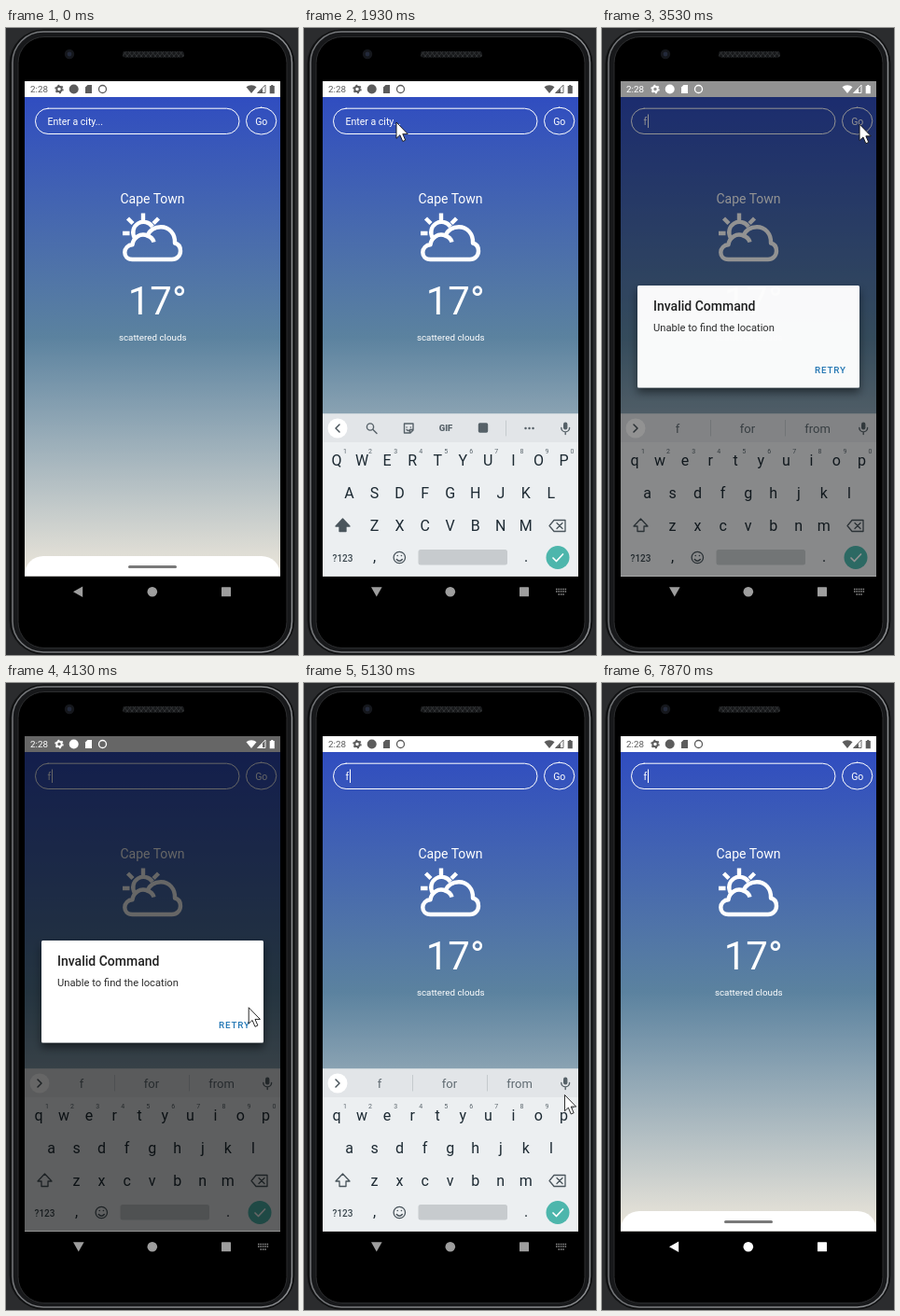
An HTML page for the animation above (7.94 s loop, 313 by 672 pixels).

```html
<!DOCTYPE html>
<html lang="en">
<head>
<meta charset="utf-8">
<title>Weather app</title>
<style>
html, body { margin: 0; width: 100%; height: 100%; overflow: hidden; background: #2b2c2e; }
svg { display: block; width: 100vw; height: 100vh; font-family: Roboto, "Noto Sans", sans-serif; user-select: none; cursor: default; }
.line { fill: none; stroke-linecap: round; stroke-linejoin: round; }
.mid { text-anchor: middle; }
.white { fill: #fff; }
.key { font-size: 16px; fill: #1d2a33; text-anchor: middle; }
.num { font-size: 7px; fill: #5b666d; text-anchor: middle; }
.word { font-size: 13px; fill: #5f6a71; text-anchor: middle; }
.tool { stroke: #566168; stroke-width: 1.4; }
</style>
</head>
<body>
<svg viewBox="0 0 313 672" preserveAspectRatio="none">
  <defs>
    <linearGradient id="sky" x1="0" y1="0" x2="0" y2="1">
      <stop offset="0" stop-color="#304dc0"/>
      <stop offset=".5" stop-color="#5b829f"/>
      <stop offset="1" stop-color="#ede7db"/>
    </linearGradient>
    <linearGradient id="rim" x1="0" y1="0" x2="1" y2="0">
      <stop offset="0" stop-color="#747679"/>
      <stop offset=".5" stop-color="#85878a"/>
      <stop offset="1" stop-color="#8d8f92"/>
    </linearGradient>
    <pattern id="mesh" width="5" height="6" patternUnits="userSpaceOnUse">
      <path d="M0 0L5 6M5 0L0 6" stroke="#303234" stroke-width="1"/>
    </pattern>
    <clipPath id="screen"><rect x="20" y="57" width="274" height="530.5"/></clipPath>
    <filter id="shade" x="-20%" y="-20%" width="140%" height="150%">
      <feDropShadow dx="0" dy="5" stdDeviation="5" flood-opacity=".5"/>
    </filter>
  </defs>

  <!-- phone body -->
  <rect width="313" height="672" fill="#2b2c2e"/>
  <rect x="4.5" y="2.5" width="304" height="668" rx="36" fill="#151617" stroke="#111213" stroke-width="2"/>
  <rect x="7" y="4" width="299.5" height="665" rx="33" fill="#17181a" stroke="url(#rim)" stroke-width="1.5"/>
  <rect x="13" y="9.5" width="288" height="655" rx="28" fill="#000" stroke="#2c2d2f"/>
  <circle cx="68" cy="28" r="5.2" fill="#15171c"/>
  <circle cx="68" cy="28" r="2.4" fill="#23293a"/>
  <rect x="125" y="25" width="66" height="6.5" rx="3" fill="#17181a"/>
  <rect x="125" y="25" width="66" height="6.5" rx="3" fill="url(#mesh)"/>

  <g clip-path="url(#screen)">
    <!-- weather -->
    <rect x="20" y="74" width="274" height="514" fill="url(#sky)"/>
    <rect class="line" x="31.5" y="86.2" width="218.5" height="27.3" rx="13.6" stroke="#fff"/>
    <text id="entry" class="white" x="44.6" y="103.6" font-size="10.5">Enter a city...</text>
    <rect id="caret" class="white" y="92.5" width="1" height="14.5"/>
    <g id="go">
      <rect class="line" x="257.5" y="85.2" width="32.3" height="28.8" rx="16" ry="14.4" stroke="#fff"/>
      <text class="white mid" x="273.7" y="103.6" font-size="10.5">Go</text>
    </g>
    <text class="white mid" x="157" y="188.4" font-size="14">Cape Town</text>
    <g class="line" stroke="#fff" stroke-width="4.4" style="stroke-linecap:butt">
      <path d="M135.5 248C130 248 127.3 244.400 127.300 240.500C127.300 236 131 232.500 135.500 232.300C136.500 224.500 144 219.500 151.500 222.500C154.500 216 160 213.300 166 213.300C175 213.300 181.500 220.500 181 230.500C185 231.500 187 235 187 239C187 244 183 248 178 248Z"/>
      <path d="M151 222.500C155 223.500 157.500 226 158.500 229.500"/>
      <path d="M138 225A10.500 10.500 0 0 1 157 213M147 198.500V206M130.500 204L136 209.500M125 220H132.500M163.500 204L158 209.500"/>
    </g>
    <text class="white" x="130.700" y="307" font-size="42">17°</text>
    <text class="white mid" x="157.200" y="335" font-size="9.8">scattered clouds</text>
    <path class="white" d="M20 588V586A20 20 0 0 1 40 566H274A20 20 0 0 1 294 586V588Z"/>
    <rect x="131" y="576" width="52" height="3" rx="1.5" fill="#797979"/>

    <!-- keyboard -->
    <g id="board">
      <rect x="20" y="413.500" width="274" height="176" fill="#eceff1"/>
      <rect x="20" y="413.500" width="274" height="30.500" fill="#e2e5e8"/>
      <circle class="white" cx="36" cy="429" r="10.500"/>
      <path id="chevron" class="line" d="M38 425L34 429L38 433" stroke="#49545b" stroke-width="1.500"/>
      <g id="tools" class="line tool">
        <circle cx="71" cy="427.500" r="3.600"/><path d="M74 430.500L78 434.500"/>
        <path d="M107.500 424H117V431L114 434H107.500ZM117 430.500H113.500V434M110 428h.1M114.300 428h.1M110 430.500Q112 432.500 114 430.500"/>
        <text class="mid" x="152" y="432.300" font-size="9.500" font-weight="900" fill="#566168" stroke="none">GIF</text>
        <rect x="187.500" y="424" width="9" height="9" rx="1" fill="#566168"/>
        <path d="M216.500 421V437" stroke="#c5cacd" stroke-width="1"/>
        <path d="M237.500 429h.1M241.500 429h.1M245.500 429h.1" stroke-width="2.400"/>
      </g>
      <g id="words">
        <path d="M116.500 420V437.500M196.500 420V437.500" stroke="#c5cacd"/>
        <text class="word" x="81" y="433.500">f</text>
        <text class="word" x="156" y="433.500">for</text>
        <text class="word" x="231" y="433.500">from</text>
      </g>
      <rect x="278" y="422.500" width="4.400" height="8" rx="2.200" fill="#566168"/>
      <path class="line tool" d="M275.800 428.500A4.400 4.400 0 0 0 284.600 428.500M280.200 433V435.500"/>
      <g id="keys"></g>
      <path id="shift" class="line" d="M41.500 526L49 534H45V539.500H38V534H34Z" stroke="#4a555c" stroke-width="1.300"/>
      <path class="line" d="M263 533.500L268 527.500H280V539.500H268ZM271 530.500L277 536.500M277 530.500L271 536.500" stroke="#4a555c" stroke-width="1.300"/>
      <text class="mid" x="41.500" y="571.500" font-size="10" font-weight="500" fill="#3c484f">?123</text>
      <text class="key" x="75.500" y="571.500">,</text>
      <text class="key" x="238" y="571.500">.</text>
      <circle class="line" cx="102.300" cy="567.500" r="6.200" stroke="#4a555c" stroke-width="1.300"/>
      <path class="line" d="M100.200 565.500h.1M104.400 565.500h.1M99.300 569.500Q102.300 573 105.300 569.500" stroke="#4a555c" stroke-width="1.500"/>
      <rect x="122.500" y="559" width="95.500" height="16.500" rx="2.500" fill="#c7cbce"/>
      <circle cx="272" cy="567.500" r="12.500" fill="#4db6ac"/>
      <path class="line" d="M267 568L270.500 571.500L277.500 564" stroke="#fff" stroke-width="1.700"/>
    </g>

    <!-- status bar -->
    <rect class="white" x="20" y="57" width="274" height="17"/>
    <rect id="dim" x="20" y="57" width="274" height="531"/>
    <g id="status" fill="currentColor">
      <text x="26" y="69.200" font-size="9.800">2:28</text>
      <circle class="line" cx="57" cy="65.500" r="2.700" stroke="currentColor" stroke-width="1.900"/>
      <circle class="line" cx="57" cy="65.500" r="4" stroke="currentColor" stroke-width="1.500" stroke-dasharray="1.900 2.290" style="stroke-linecap:butt"/>
      <circle cx="72.700" cy="65.500" r="5"/>
      <path d="M87.500 61H92V70H85V63.500Z"/>
      <circle class="line" cx="103.500" cy="65.500" r="4" stroke="currentColor" stroke-width="1.300"/>
      <path d="M263 70L257.500 63.300A8.500 8.500 0 0 1 268.500 63.300Z"/>
      <path d="M275 64.800V70H269.500Z"/>
      <path class="line" d="M278 61.500V69.500H270Z" stroke="currentColor" stroke-width=".9"/>
      <path d="M282.700 62H284.200V61H286.300V62H287.800V70.200H282.700Z"/>
    </g>

    <!-- alert -->
    <g id="alert">
      <rect class="white" x="38" y="276" width="238" height="109.500" rx="1.500" filter="url(#shade)"/>
      <text x="55" y="303.300" font-size="14" font-weight="500" fill="#1f1f1f">Invalid Command</text>
      <text x="55" y="325" font-size="11.200" fill="#2b2b2b">Unable to find the location</text>
      <text x="228" y="370" font-size="9.800" font-weight="500" letter-spacing=".87" fill="#2277b5">RETRY</text>
    </g>
  </g>

  <!-- navigation bar -->
  <rect id="ripple" x="46" y="588" width="64" height="32.500" rx="16" fill="#2e3031"/>
  <g id="nav">
    <path id="back" d="M72 604.300L82.200 598.500V610.100Z"/>
    <circle cx="156.800" cy="604.300" r="5.300"/>
    <rect x="231" y="599.300" width="10" height="10" rx=".6"/>
    <path id="mini" class="line" d="M270 601.500H281.500M270 604H281.500M272.500 607H279" stroke="#8f8f8f" stroke-width="1.500" stroke-dasharray="1.500 .9" style="stroke-linecap:butt"/>
  </g>
  <path id="arrow" d="M0 0V17.300L3.900 13.700L6.800 20.500L9.700 19.200L6.800 12.600H12.200Z" fill="#fff" stroke="#111" stroke-width=".9"/>
</svg>
<script>
const LOOP = 7940, STEP = 200 / 3;
const $ = id => document.getElementById(id);
const set = (id, name, value) => $(id).setAttribute(name, value);
const show = (id, on) => set(id, 'opacity', on === true ? 1 : on || 0);

const rows = [['QWERTYUIOP', 35, 468.5], ['ASDFGHJKL', 48.5, 503.5], ['ZXCVBNM', 75.5, 538.5]];
const letters = [];
function label(cls, x, y, text) {
  const el = document.createElementNS('http://www.w3.org/2000/svg', 'text');
  el.setAttribute('class', cls);
  el.setAttribute('x', x);
  el.setAttribute('y', y);
  el.textContent = text;
  $('keys').append(el);
  return el;
}
rows.forEach(([row, x0, y], r) => [...row].forEach((ch, i) => {
  const x = x0 + i * 27.05;
  letters.push({ el: label('key', x, y, ch), ch });
  if (!r) label('num', x + 9, 456, (i + 1) % 10);
}));

// each stop: time, then one or more values
const path = [
  [130, 295, 455], [200, 270, 375], [330, 200, 212], [470, 136, 126], [600, 104, 104], [670, 99, 101],
  [2330, 99, 101], [2400, 106, 104], [2530, 160, 111], [2730, 245, 92], [2800, 271, 79], [2930, 277, 95], [3000, 276, 103],
  [3530, 276, 103], [3600, 277, 108], [3870, 274, 200], [4000, 268, 290], [4130, 260.5, 346.5], [4200, 254, 374], [4330, 253, 388],
  [4400, 253, 388], [4470, 251, 383], [4730, 244, 365],
  [4930, 244, 365], [5000, 251, 380], [5130, 280, 440.5], [5400, 235, 520], [5730, 120, 590], [5930, 85, 612], [6130, 76, 608], [6400, 78.5, 604.5],
  [6730, 78.5, 602], [7000, 90, 580], [7330, 115, 553], [7400, 113, 563], [7470, 107, 588], [7530, 94, 620], [7600, 72, 655], [7670, 60, 680]
];
const slide = [[800, 174], [870, 125], [930, 65], [1000, 25], [1070, 7], [1130, 0], [6400, 0], [6470, 1], [6530, 16], [6600, 66], [6670, 130], [6730, 176]];
const shadow = [[3400, 0], [3470, .2], [3530, .42], [3600, .55], [3670, .6], [4930, .6], [5000, .4], [5070, .15], [5130, 0]];
const popup = [[3400, 0], [3470, .6], [3530, .97], [3600, 1], [4930, 1], [5000, .5], [5070, .12], [5130, 0]];
const press = [[2730, 1], [2800, .3], [2870, .45], [3000, 1]];
const tap = [[6270, 0], [6400, 1], [6500, 1], [6800, 0]];
const glow = [[6330, 158], [6470, 200], [6600, 255]];

function at(stops, t) {
  const n = stops.findIndex(s => s[0] > t);
  if (n === 0) return stops[0].slice(1);
  if (n < 0) return stops[stops.length - 1].slice(1);
  const a = stops[n - 1], b = stops[n], k = (t - a[0]) / (b[0] - a[0]);
  return a.slice(1).map((v, i) => v + (b[i + 1] - v) * k);
}
const within = (t, ...spans) => spans.some(([a, b]) => t >= a && t < b);

function draw(t) {
  const typed = t >= 2200, open = within(t, [870, 6600]);
  $('entry').textContent = typed ? 'f' : 'Enter a city...';
  set('caret', 'x', typed ? 49 : 45.3);
  show('caret', within(t, [600, 870], [1400, 1930], [2200, 2800], [3330, 5730], [6270, 6800], [7330, 7870]));
  show('go', at(press, t)[0]);

  set('board', 'transform', `translate(0 ${at(slide, t)[0]})`);
  show('board', within(t, [870, 6730]));
  letters.forEach(k => k.el.textContent = typed ? k.ch.toLowerCase() : k.ch);
  set('shift', 'style', typed ? '' : 'fill:#4a555c');
  set('chevron', 'transform', typed ? 'rotate(180 36 429)' : '');
  show('tools', !typed);
  show('words', within(t, [2200, 6470]));

  const alpha = at(popup, t)[0];
  show('dim', at(shadow, t)[0]);
  show('alert', alpha);
  set('status', 'color', alpha > .3 ? '#fff' : '#5c5c5c');

  const g = Math.round(at(glow, t)[0]);
  set('nav', 'fill', `rgb(${g},${g},${g})`);
  set('back', 'transform', open ? 'rotate(-90 77.5 604)' : '');
  show('mini', within(t, [870, 6470]));
  show('ripple', at(tap, t)[0]);

  const [x, y] = at(path, t);
  set('arrow', 'transform', `translate(${x} ${y})`);
  show('arrow', within(t, [130, 7670]));
}

const start = performance.now();
function tick() {
  const t = (performance.now() - start) % LOOP;
  draw(Math.floor((t + 4) / STEP) * STEP);
  requestAnimationFrame(tick);
}
tick();
</script>
</body>
</html>
```
